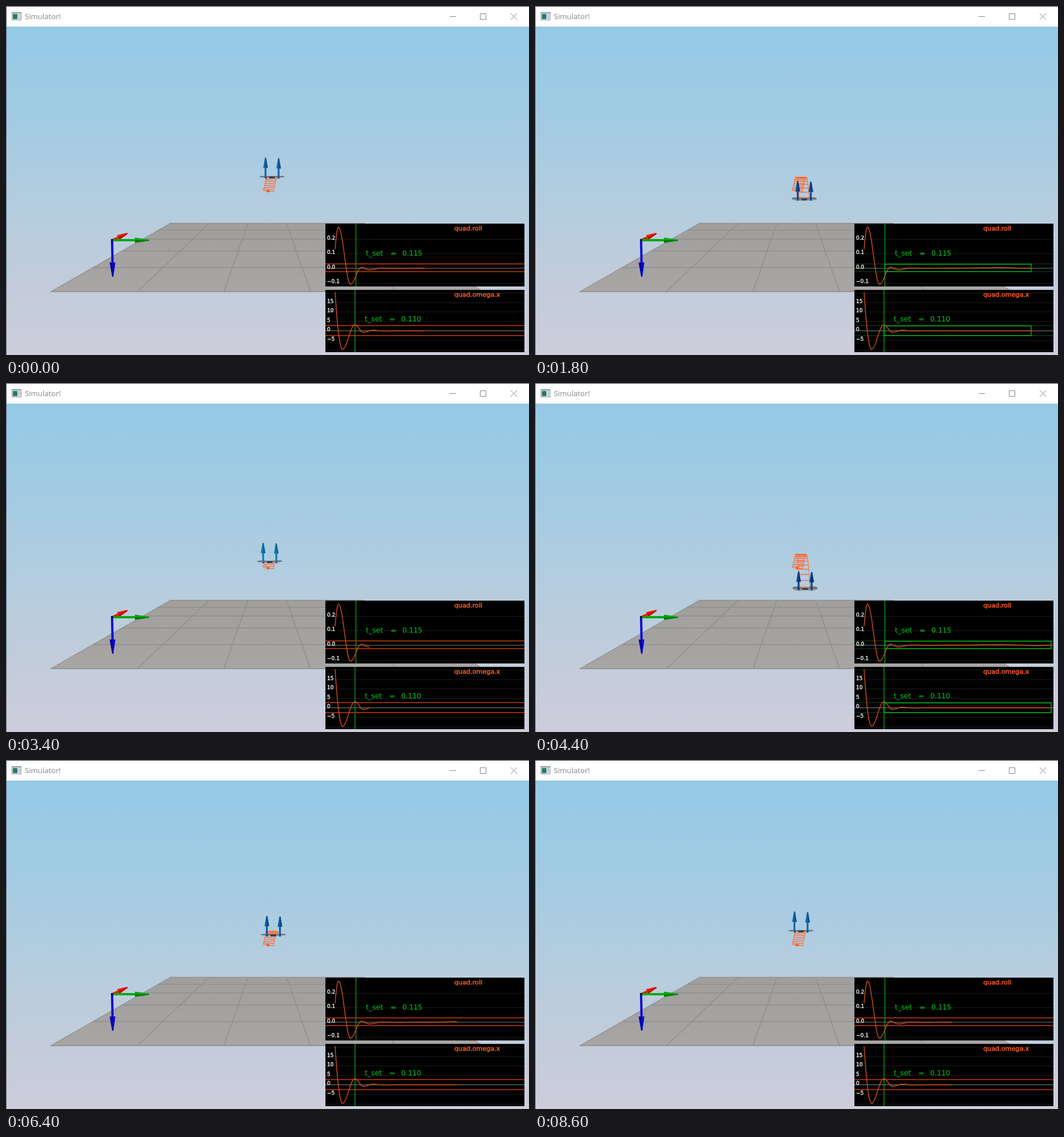
An HTML page with a canvas that plays this animation: 917 by 611 pixels, repeating every 8.8 s.

```html
<!DOCTYPE html>
<html lang="en">
<head>
<meta charset="utf-8">
<title>Simulator!</title>
<style>
html, body { margin: 0; width: 100%; height: 100%; overflow: hidden; background: #fff; }
canvas { display: block; }
</style>
</head>
<body>
<canvas id="stage" width="917" height="611"></canvas>
<script>
const ctx = document.getElementById('stage').getContext('2d');
const LOOP = 8800, STEP = 200, SPAN = 332, X0 = 577, SETTLED = 235;
const ORANGE = '#ff5a1e', GREEN = '#00c81e';

// Time, completed runs, position inside the run (plot pixels).
const pace = [[0, 0, 157], [1800, 1, 293], [2600, 2, 178], [4400, 3, 328],
  [5600, 4, 318], [7200, 6, 109], [8600, 7, 154]]
  .map(([t, lap, p]) => [t, lap * SPAN + p]);

const plots = [
  { top: 381, h: 110, zero: 459, gap: 25.6, band: [451.5, 465], set: 36.5, time: '0.115',
    name: 'quad.roll', labels: ['0.2', '0.1', '0.0', '\u22120.1'], first: 408.5, base: 437, tx: 631,
    pts: [[0, 426], [6, 387], [27, 487], [46, 457.5], [60, 462], [82, 458.8], [110, 459.5],
      [150, 459], [240, 458], [305, 459.8], [340, 458.6]] },
  { top: 497, h: 109, zero: 568.5, gap: 16.6, band: [559.5, 577], set: 35, time: '0.110',
    name: 'quad.omega.x', labels: ['15', '10', '5', '0', '\u22125'], first: 519.5, base: 552, tx: 629,
    pts: [[0, 501], [13, 601], [34.5, 558], [50, 571.5], [66, 567.5], [84, 568.9], [110, 568.5], [340, 568.5]] }
];

const lerp = (a, b, s) => a + (b - a) * s;

function segment(pts, x) {
  let i = 0;
  while (i < pts.length - 2 && x > pts[i + 1][0]) i++;
  const [a, b] = [pts[i], pts[i + 1]];
  return { i, a: a[1], b: b[1], s: (x - a[0]) / (b[0] - a[0]) };
}

function progress(t) {
  const g = segment(pace, t);
  return lerp(g.a, g.b, g.s) % SPAN;
}

// Eases between extrema; the opening stretch starts at full slope.
function curve(pts, p) {
  const { i, a, b, s } = segment(pts, p);
  return lerp(a, b, i ? (1 - Math.cos(Math.PI * s)) / 2 : 1 - (1 - s) ** 2);
}

function pose(p) {
  const fall = y => 298.5 + 0.00202 * (y - 155) ** 2;
  return {
    x: 460 + 0.0413 * p,
    y: p < 109 ? fall(109) + 0.186 * (109 - p) : fall(p),
    roll: (459 - curve(plots[0].pts, p)) / 256
  };
}

function rect(x, y, w, h, color) {
  ctx.fillStyle = color;
  ctx.fillRect(x, y, w, h);
}

function path(pts, color, width = 1) {
  ctx.beginPath();
  pts.forEach(([x, y]) => ctx.lineTo(x, y));
  ctx.strokeStyle = color;
  ctx.lineWidth = width;
  ctx.stroke();
}

function poly(pts, color) {
  ctx.beginPath();
  pts.forEach(([x, y]) => ctx.lineTo(x, y));
  ctx.closePath();
  ctx.fillStyle = color;
  ctx.fill();
}

function oval(x, y, rx, ry, color) {
  ctx.beginPath();
  ctx.ellipse(x, y, rx, ry, 0, 0, Math.PI * 2);
  ctx.fillStyle = color;
  ctx.fill();
}

function text(str, x, y, size, color, weight = 0) {
  ctx.font = `${size}px "DejaVu Sans", sans-serif`;
  ctx.fillStyle = ctx.strokeStyle = color;
  ctx.fillText(str, x, y);
  if (weight) {
    ctx.lineWidth = weight;
    ctx.strokeText(str, x, y);
  }
}

function arrow(x0, y0, x1, y1, color, dark, shaft, head, wide) {
  const len = Math.hypot(x1 - x0, y1 - y0);
  ctx.save();
  ctx.translate(x0, y0);
  ctx.rotate(Math.atan2(y1 - y0, x1 - x0));
  rect(0, -shaft / 2, len - head, shaft, color);
  poly([[len - head, -wide / 2], [len, -1], [len, 1], [len - head, wide / 2]], color);
  poly([[len - head, 0], [len, 0], [len, 1], [len - head, wide / 2]], dark);
  ctx.restore();
}

function drawWindow() {
  rect(0, 0, 917, 36, '#fff');
  rect(0, 0, 917, 1, '#26323c');
  rect(0, 0, 1, 611, '#53626d');
  rect(10, 11, 17, 14, '#8b9196');
  rect(11, 13, 15, 11, '#f4f6f6');
  rect(12, 14, 8, 9, '#237a72');
  rect(21, 14, 4, 9, '#c3cacd');
  ctx.font = '13.2px "Open Sans", "Noto Sans", sans-serif';
  ctx.fillStyle = '#858585';
  ctx.fillText('Simulator!', 33, 23);
  const ink = '#858585';
  path([[778, 18.5], [789, 18.5]], ink);
  ctx.strokeRect(831.5, 13.5, 10, 10);
  path([[885, 13], [896, 24]], ink);
  path([[896, 13], [885, 24]], ink);
}

function drawWorld() {
  const sky = ctx.createLinearGradient(0, 36, 0, 611);
  sky.addColorStop(0, '#94cae6');
  sky.addColorStop(0.3, '#a4cbe3');
  sky.addColorStop(0.55, '#b4cddf');
  sky.addColorStop(0.78, '#c2ccda');
  sky.addColorStop(1, '#cdcddc');
  rect(0, 36, 917, 575, sky);

  const floor = ctx.createLinearGradient(0, 380, 0, 500);
  floor.addColorStop(0, '#a09f9e');
  floor.addColorStop(1, '#a7a6a5');
  poly([[289, 380], [627, 380], [838, 500.5], [78, 500.5]], floor);
  const line = '#8f8e8d';
  for (let i = 0; i <= 5; i++) {
    path([[289 + i * 67.6, 380], [78 + i * 152, 500.5]], line, 1.4);
  }
  for (const y of [380.5, 392.5, 408, 429, 458, 500]) {
    const s = (y - 380) / 120.5;
    path([[lerp(289, 78, s), y], [lerp(627, 838, s), y]], line, 1.4);
  }

  arrow(186, 410, 213, 398, '#f01800', '#b81200', 4, 18, 9);
  arrow(185, 410, 251, 410, '#00a80c', '#007a08', 4, 25, 9);
  arrow(186, 409, 187.3, 474, '#0808d8', '#0404a0', 4, 25, 10);
  rect(184, 408, 4, 4, '#101060');
}

function drawTrail(p) {
  const edge = (q, side) => {
    const { x, y, roll } = pose(q);
    return [x + 9 * side, y + 1 + 9 * side * roll];
  };
  for (const side of [-1, 1]) {
    const pts = [];
    for (let q = 0; q < p; q += 3) pts.push(edge(q, side));
    pts.push(edge(p, side));
    path(pts, '#ff7440', 1.2);
  }
  for (let q = 0; q <= p; q += 18) path([edge(q, -1), edge(q, 1)], '#ff6a34', 1.3);
  rect(457, 322, 5, 4, '#ff5a20');
}

function drawDrone(p) {
  const { x, y, roll } = pose(p);
  const low = Math.max(0, Math.min(1, (y - 298) / 60));
  const s = p / SPAN;
  const tint = k => `rgb(${[lerp(20, 10, s), lerp(136, 66, s), lerp(188, 148, s)].map(c => Math.round(c * k))})`;
  const tilt = p < 100 ? roll : 0;
  ctx.save();
  ctx.translate(x, y);
  ctx.rotate(tilt);
  for (const side of [-1, 1]) {
    oval(side * 14, 0.3, 8, 1.1 + 2.2 * low, '#777b7e');
    oval(side * 11, 1 + low, 8, 1 + 1.8 * low, '#8d9092');
  }
  path([[-21.5, 0], [21.5, 0]], '#62686c', 1.4);
  rect(-5, 0, 10, 3.5, '#36414c');
  rect(-12.5, 1, 3, 2.5, '#222b34');
  rect(10, 1, 3, 2.5, '#222b34');
  for (const side of [-1, 1]) {
    arrow(side * 11.5, 2 + low, side * 11.5, lerp(-33, -29, low) + (side > 0 ? 1 : 0),
      tint(1), tint(0.8), 3.2, 18, 8);
  }
  ctx.restore();
}

function drawPlot(plot, p) {
  const { top, h, zero, gap, band, pts, set, tx, base } = plot;
  const across = (y, color, width) => path([[560, y], [909, y]], color, width);
  ctx.save();
  ctx.beginPath();
  ctx.rect(560, top, 349, h);
  ctx.clip();
  rect(560, top, 349, h, '#000');
  for (let i = -2; i <= 4; i++) across(Math.round(zero + i * -gap) + 0.5, '#1b1b1b');
  across(zero, '#707070', 1.2);

  const done = p >= SETTLED;
  band.forEach(y => across(y, done ? '#0a3510' : '#c83c10', 1.3));
  if (p >= set) {
    path([[X0 + set, top], [X0 + set, top + h]], '#00a018', 1.4);
    text('t_set', tx, base, 12.5, GREEN);
    text('=', tx + 43, base, 12.5, GREEN);
    text(plot.time, tx + 64, base, 12.2, GREEN);
  }

  const trace = [];
  for (let q = 0; q < p; q++) trace.push([X0 + q, curve(pts, q)]);
  trace.push([X0 + p, curve(pts, p)]);
  path(trace, '#d8501c', 1.4);
  if (done) {
    ctx.strokeStyle = '#00b41a';
    ctx.lineWidth = 1.4;
    ctx.strokeRect(X0 + set, band[0] + 0.5, p - set, band[1] - band[0] - 0.5);
  }

  plot.labels.forEach((label, i) => text(label, 563, plot.first + i * gap, 9, '#f2f2f2', 0.4));
  text(plot.name, 786, top + 12, 11.2, ORANGE, 0.5);
  ctx.restore();
}

function draw(now) {
  const t = Math.floor((now % LOOP) / STEP) * STEP;
  const p = progress(t);
  ctx.lineJoin = 'round';
  drawWorld();
  drawTrail(p);
  drawDrone(p);
  plots.forEach(plot => drawPlot(plot, p));
  drawWindow();
}

let start;
function tick(now) {
  start ??= now;
  draw(Math.max(0, now - start));
  requestAnimationFrame(tick);
}
draw(0);
requestAnimationFrame(tick);
</script>
</body>
</html>
```
